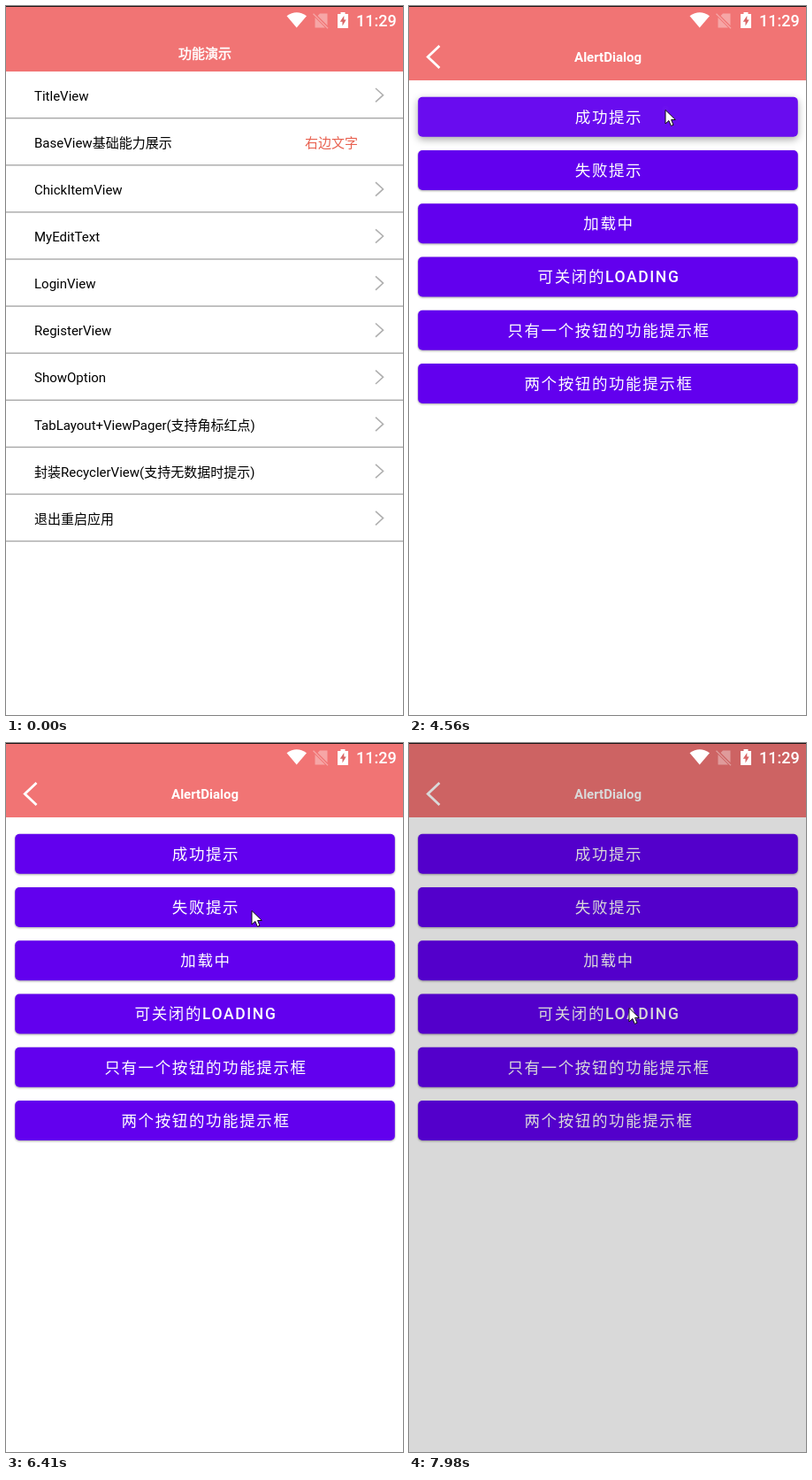
Write an HTML page that moves like this. It is 449 px wide and 801 px high and loops after 8000 ms.

```html
<!DOCTYPE html>
<html lang="zh-CN">
<head>
<meta charset="utf-8">
<title>功能演示</title>
<style>
  html, body { margin: 0; width: 100%; height: 100%; overflow: hidden; background: #fff; }
  svg { display: block; width: 100vw; height: 100vh; }
  text { font-family: Roboto, "Noto Sans CJK SC", "Noto Sans CJK", sans-serif; white-space: pre; }
  .mid { text-anchor: middle; }
  .bar { font-size: 15px; font-weight: 700; fill: #fff; }
  .cjk { font-weight: 400; stroke: #fff; stroke-width: .5px; }
  .row { font-size: 15px; fill: #000; }
  .btn text { font-size: 17.5px; letter-spacing: 1.6px; fill: #fff; }
  .latin { font-weight: 500; }
  .msg { font-size: 20px; }
  .head { font-size: 22.5px; font-weight: 700; }
  .ok { font-size: 20px; letter-spacing: 1px; fill: #1f7ce0; }
  .dialog { transform-origin: 225px 417px; }
</style>
</head>
<body>
<svg viewBox="0 0 449 801" preserveAspectRatio="none">
  <g id="list">
    <rect width="449" height="801" fill="#fff"/>
    <rect width="449" height="74" fill="#f17474"/>
    <text class="bar cjk mid" x="225" y="58.500">功能演示</text>
  </g>
  <g id="page">
    <rect width="449" height="870" fill="#fff"/>
    <rect width="449" height="84" fill="#f17474"/>
    <path d="M34.500 45 21.300 57.500 34.500 70" fill="none" stroke="#fff" stroke-width="2.8"/>
    <text class="bar mid" x="225" y="63">AlertDialog</text>
  </g>
  <rect id="dim" width="449" height="801"/>
  <g id="dialogs"></g>
  <rect width="449" height="1" fill="#1c1616"/>
  <g fill="#fff">
    <path d="M317.500 11.200Q328.700 3.200 340 11.200L328.700 24.500Z"/>
    <g opacity=".36">
      <path d="M363.500 8.500H355L352.500 11 363.500 22ZM349.500 13V24.500H361Z"/>
      <path d="M347.500 8.700 364 25.200" stroke="#fff" stroke-width="1.3"/>
    </g>
    <path d="M378.500 7h5v2h3.500v16h-12V9h3.500z"/>
    <path d="M382.300 11 377.800 17.700H380.500V22.500L384.700 15.500H382.300Z" fill="#d96565"/>
    <text x="396" y="23" font-size="18" font-weight="500">11:29</text>
  </g>
  <path id="cursor" d="M0 .5V16L3.900 12.500 6.400 18.400 9 17.300 6.600 11.500H11.300Z" fill="#fff" stroke="#111" stroke-linejoin="round"/>
</svg>
<script>
const LOOP = 8000;
const $ = id => document.getElementById(id);
const ramp = (t, start, span) => Math.min(1, Math.max(0, (t - start) / span));
const smooth = k => k * k * (3 - 2 * k);
const easeOut = k => 1 - (1 - k) ** 3;
const pulse = (t, on, up, off, down) => ramp(t, on, up) - ramp(t, off, down);

function add(parent, tag, attrs, text) {
  const el = document.createElementNS("http://www.w3.org/2000/svg", tag);
  for (const k in attrs) el.setAttribute(k, attrs[k]);
  if (text) el.textContent = text;
  parent.append(el);
  return el;
}

const rows = ["TitleView", "BaseView基础能力展示", "ChickItemView", "MyEditText", "LoginView",
  "RegisterView", "ShowOption", "TabLayout+ViewPager(支持角标红点)",
  "封装RecyclerView(支持无数据时提示)", "退出重启应用"];

rows.forEach((label, i) => {
  const list = $("list"), top = 53.1 * i, y = Math.round(106.8 + top);
  add(list, "text", { class: "row", x: 32, y }, label);
  add(list, "rect", { y: 126 + top, width: 449, height: 1.4, fill: "#a9a9a9" });
  if (i === 1) add(list, "text", { class: "row", x: 338, y, style: "fill:#e8604f" }, "右边文字");
  else add(list, "path", { d: `M418 ${93 + top}l8.500 7.700-8.500 7.700`, fill: "none", stroke: "#b0b0b0", "stroke-width": 1.6 });
});

const labels = ["成功提示", "失败提示", "加载中", "可关闭的LOADING", "只有一个按钮的功能提示框", "两个按钮的功能提示框"];

const buttons = labels.map((label, i) => {
  const top = 60.25 * i;
  const box = { x: 10.2, y: 102.8 + top, width: 429.6, height: 45, rx: 5 };
  const g = add($("page"), "g", { class: "btn" });
  add(g, "rect", { ...box, fill: "#6200ee" });
  add(add(g, "clipPath", { id: "clip" + i }), "rect", box);
  const ink = add(g, "g", { "clip-path": `url(#clip${i})`, fill: "#fff" });
  const glow = add(ink, "rect", { ...box, opacity: 0 });
  const wave = add(ink, "circle", { opacity: 0 });
  const text = add(g, "text", { class: "mid", x: 226, y: Math.round(131.7 + top) });
  const [, cjk, latin] = label.match(/^([^A-Z]*)([A-Z]*)$/);
  text.textContent = cjk;
  if (latin) add(text, "tspan", { class: "latin" }, latin);
  return { g, glow, wave, start: Infinity };
});
Object.assign(buttons[0], { start: 4490, x: 290, y: 117 });
Object.assign(buttons[1], { start: 6600, x: 278, y: 189 });

function drawButton({ g, glow, wave, start, x, y }, time) {
  const t = time - start;
  const lift = pulse(t, 0, 60, 250, 150);
  g.style.filter = `drop-shadow(0 ${1 + 2 * lift}px ${1 + 3 * lift}px rgba(0,0,0,.35))`;
  if (start === Infinity) return;
  glow.setAttribute("opacity", .2 * pulse(t, 50, 90, 330, 230));
  wave.setAttribute("opacity", .12 * pulse(t, 60, 90, 330, 230));
  wave.setAttribute("cx", x);
  wave.setAttribute("cy", y);
  wave.setAttribute("r", 180 * ramp(t, 60, 500));
}

function dialog(height, title, msg, open, close) {
  const g = add($("dialogs"), "g", { class: "dialog" });
  const top = 417.5 - height / 2, end = top + height;
  add(g, "rect", { x: 33, y: top, width: 384, height, rx: 12, fill: "#eaeaea", "fill-opacity": .985 });
  add(g, "rect", { x: 33, y: end - 55, width: 384, height: 1, fill: "#c2c2c4" });
  if (title) add(g, "text", { class: "head mid", x: 225, y: top + 42.5 }, title);
  add(g, "text", { class: "msg mid", x: 225, y: end - 73 }, msg);
  add(g, "text", { class: "ok mid", x: 225.5, y: end - 19.2 }, "确定");
  return { g, open, close };
}
const dialogs = [
  dialog(113, "", "成功", 4690, 5810),
  dialog(163, "提示", "失败", 6680, 7729)
];

function drawDialog({ g, open, close }, t) {
  g.setAttribute("opacity", pulse(t, open, 130, close, 140));
  g.style.transform = `scale(${.9 + .1 * easeOut(ramp(t, open, 150))})`;
}

// each move: start, end, target x, target y, sideways bend
const moves = [
  [570, 1330, 304, 346],
  [1330, 2320, 319, 156, 14],
  [3150, 3690, 308, 296],
  [3690, 4490, 290, 117],
  [4600, 5270, 265, 424, 12],
  [5310, 5520, 245, 450],
  [5915, 6410, 278, 189],
  [6688, 7380, 246, 466, 18],
  [7700, LOOP, 249, 297]
];

function cursorAt(t) {
  let x = -14, y = 426;
  for (const [start, end, toX, toY, bend = 0] of moves) {
    if (t < start) break;
    const k = smooth(ramp(t, start, end - start));
    x += (toX - x) * k + bend * Math.sin(Math.PI * k);
    y += (toY - y) * k;
  }
  return [x, y];
}

function draw(now) {
  const t = now % LOOP;
  const enter = easeOut(ramp(t, 3000, 350));
  $("page").setAttribute("opacity", ramp(t, 3000, 220));
  $("page").setAttribute("transform", `translate(0 ${64 * (1 - enter)})`);
  buttons.forEach(b => drawButton(b, t));
  dialogs.forEach(d => drawDialog(d, t));
  const shade = Math.max(...dialogs.map(d => pulse(t, d.open, 180, d.close, 335)));
  $("dim").setAttribute("opacity", .6 * shade);
  $("cursor").setAttribute("transform", `translate(${cursorAt(t)})`);
  requestAnimationFrame(() => draw(performance.now() - began));
}
const began = performance.now();
draw(0);
</script>
</body>
</html>
```
